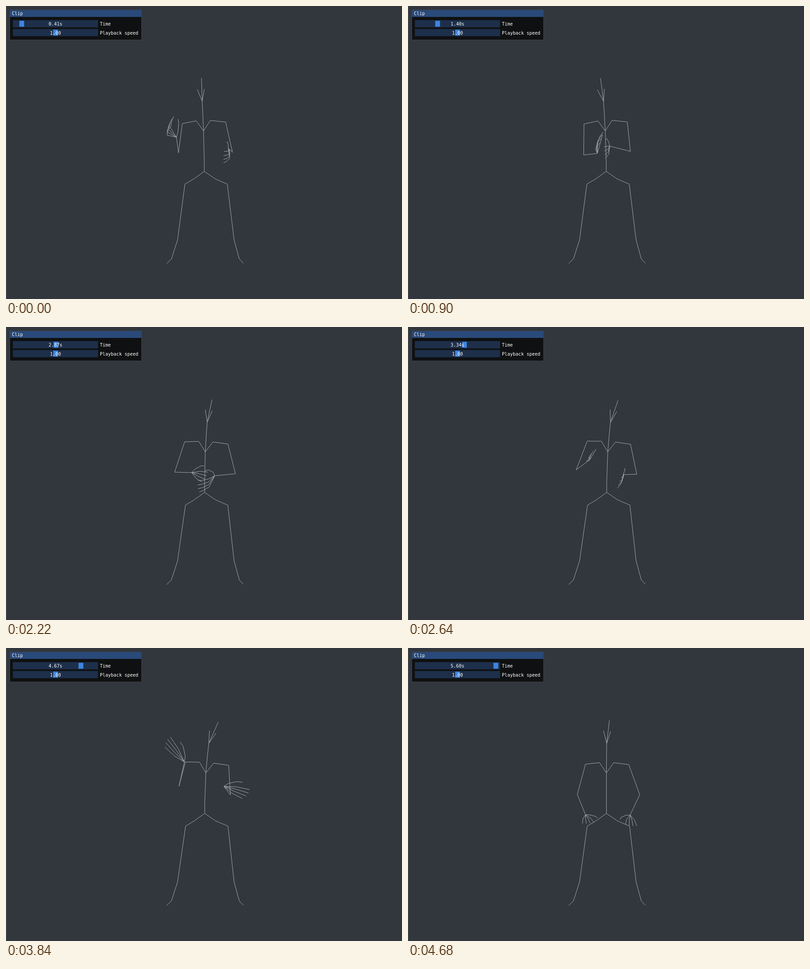
An HTML page that plays this animation: 869 by 644 pixels, repeating every 4.71 s.

```html
<!DOCTYPE html>
<html lang="en">
<head>
<meta charset="utf-8">
<title>Skeleton clip</title>
<style>
  html, body { margin: 0; width: 100%; height: 100%; overflow: hidden; background: #32363d; }
  svg { display: block; width: 869px; height: 644px; }
  text { font: 10px "DejaVu Sans Mono", monospace; fill: #fff; white-space: pre; }
  .mid { text-anchor: middle; }
  .track { fill: #1d2f4a; }
  .grab { fill: #3d85e0; }
  #bones { fill: none; stroke: #a6a8aa; stroke-width: 1; }
</style>
</head>
<body>
<svg viewBox="0 0 869 644">
  <rect width="1" height="644" fill="#4b4f56"/>
  <path id="bones"/>
  <rect x="8.5" y="8.5" width="289" height="66" fill="#0f1011" stroke="#3c4048"/>
  <rect x="9" y="9" width="288" height="15" fill="#294a7a"/>
  <text x="13" y="20">Clip</text>
  <rect class="track" x="15" y="31" width="187" height="16"/>
  <rect class="grab" id="knob" y="32.5" width="10.5" height="13"/>
  <text class="mid" id="clock" x="108.5" y="43"></text>
  <text x="206" y="43">Time</text>
  <rect class="track" x="15" y="50.5" width="187" height="16"/>
  <rect class="grab" x="103.5" y="52" width="10.5" height="13"/>
  <text class="mid" x="108.5" y="62.5">1.00</text>
  <text x="206" y="62.5">Playback speed</text>
</svg>
<script>
const LOOP = 4710, STEP = 30;
const PALM = 25;

// body: sway in px, head tilt in degrees.
// left, right: elbow x y, wrist x y, fingertips from wrist dx dy, finger curl, palm roll in degrees.
const POSES = [
  { at: 0, body: [-4.5, -1.7],
    left: [378.5, 323, 374, 288.5, -11, -34.5, -12, 115],
    right: [497, 321.5, 488, 313, -10, 19, -9, 93] },
  { at: 900, body: [-6, -7.3],
    left: [385.5, 327.5, 415.5, 324, 9, -35, -6, 106],
    right: [488, 319.5, 442.5, 308, -11, 14, -3, 84] },
  { at: 1680, body: [3, 1],
    left: [362, 315.5, 396.5, 323.5, 23, 7, 0, 105],
    right: [517, 317, 470, 331, -25, 5, 0, 84] },
  { at: 2220, body: [6.5, 12],
    left: [370, 319, 407.5, 320, 29, 10, 0, 120],
    right: [503.5, 322.5, 458, 327, -35, 23, -6, 84] },
  { at: 3090, body: [11.5, 24.3],
    left: [368, 308, 387, 263, -28, -33, -4, 126],
    right: [501.5, 324, 488, 320, 23, 11.5, 0, 137] },
  { at: 3840, body: [10, 24],
    left: [379.5, 304, 391.5, 250.5, -37, -44, 0, 119],
    right: [492.5, 323, 478, 304, 48.5, 17, 0, 129] },
  { at: 4680, body: [1, 6.8],
    left: [371.5, 322, 389.5, 366.5, 6, 18, 0, 174],
    right: [508.5, 322.5, 487.5, 367, 2, 22.5, 0, 6] }
];

const $ = id => document.getElementById(id);
const bones = $('bones'), knob = $('knob'), clock = $('clock');
const rad = deg => deg * Math.PI / 180;
const line = pts => 'M' + pts.map(p => p.map(v => v.toFixed(2)).join(' ')).join('L');

// Cubic Hermite through the poses, at rest at both ends.
function sample(part, t) {
  const last = POSES.length - 1;
  let i = 0;
  while (i < last - 1 && t >= POSES[i + 1].at) i++;
  const from = POSES[i], to = POSES[i + 1];
  const h = to.at - from.at, u = (t - from.at) / h;
  const slope = (k, j) => {
    const prev = POSES[k - 1], next = POSES[k + 1];
    return prev && next ? (next[part][j] - prev[part][j]) / (next.at - prev.at) * h : 0;
  };
  const a = u * u * (3 - 2 * u), b = u * (1 - u) * (1 - u), c = u * u * (u - 1);
  return from[part].map((v, j) =>
    v + (to[part][j] - v) * a + slope(i, j) * b + slope(i + 1, j) * c);
}

// Fingers fan across the palm; curl pushes the knuckles sideways off the reach.
function hand([x, y], [dx, dy], curl, roll) {
  const across = [PALM * Math.cos(rad(roll)), PALM * Math.sin(rad(roll))];
  const size = Math.hypot(dx, dy) || 1;
  const tip = [dx, dy];
  const knuckle = [.47 * dx - curl * dy / size, .47 * dy + curl * dx / size];
  const joint = knuckle.map((v, i) => .6 * v + .5 * tip[i]);
  const place = (v, along, side) =>
    [x + v[0] * along + across[0] * side, y + v[1] * along + across[1] * side];

  let d = line([[x, y], place(tip, .08, -.4), place(tip, .35, -.85), place(tip, .55, -.92)]);
  for (let f = 0; f < 4; f++) {
    const side = f / 3 - .5, reach = f % 3 ? 1.06 : 1;
    d += line([[x, y], place(knuckle, reach, side * .7),
      place(joint, reach, side * .88), place(tip, reach, side)]);
  }
  return d;
}

// dir is -1 for the left side of the picture, 1 for the right.
function arm(chest, sway, dir, [ex, ey, wx, wy, dx, dy, curl, roll]) {
  const collar = [chest[0] + dir * 15.5 + .2 + .14 * sway, 252 + dir * .1 * sway];
  const shoulder = [chest[0] + dir * 47.5 + 1.5 + .1 * sway, 256 + sway * (dir * .37 - .18)];
  return line([chest, collar, shoulder, [ex, ey], [wx, wy]]) +
    hand([wx, wy], [dx, dy], curl, roll);
}

function skeleton(t) {
  const [sway, tilt] = sample('body', t);
  const shift = .6 + .1 * sway;
  const pelvis = [435 + shift * .7, 363.5];
  const chest = [435 + sway * .36, 274.5];
  const neck = [435 + sway, 209.5];
  const cos = Math.cos(rad(tilt)), sin = Math.sin(rad(tilt));
  const turn = (x, y) => [neck[0] + x * cos - y * sin, neck[1] + x * sin + y * cos];

  return line([pelvis, [pelvis[0], 341], chest, [435 + sway * .7, 237], neck, turn(0, -51)]) +
    line([turn(-10, -26.5), neck, turn(5.5, -27)]) +
    line([[352.5, 566], [363, 556], [376.5, 514], [392.5 + shift, 391.5],
      [412 + shift * .7, 380], pelvis, [459 + shift * .7, 380],
      [485.5 + shift, 391.5], [500.5, 514], [512, 556], [521, 565.5]]) +
    arm(chest, sway, -1, sample('left', t)) +
    arm(chest, sway, 1, sample('right', t));
}

function draw(now) {
  const t = Math.floor((now % LOOP) / STEP) * STEP;
  const sec = .4052 + t * .0011105;
  clock.textContent = sec.toFixed(2) + 's';
  knob.setAttribute('x', (17 + sec * 30.45).toFixed(2));
  bones.setAttribute('d', skeleton(t));
}

const start = performance.now();
function tick() {
  draw(performance.now() - start);
  requestAnimationFrame(tick);
}
tick();
</script>
</body>
</html>
```
